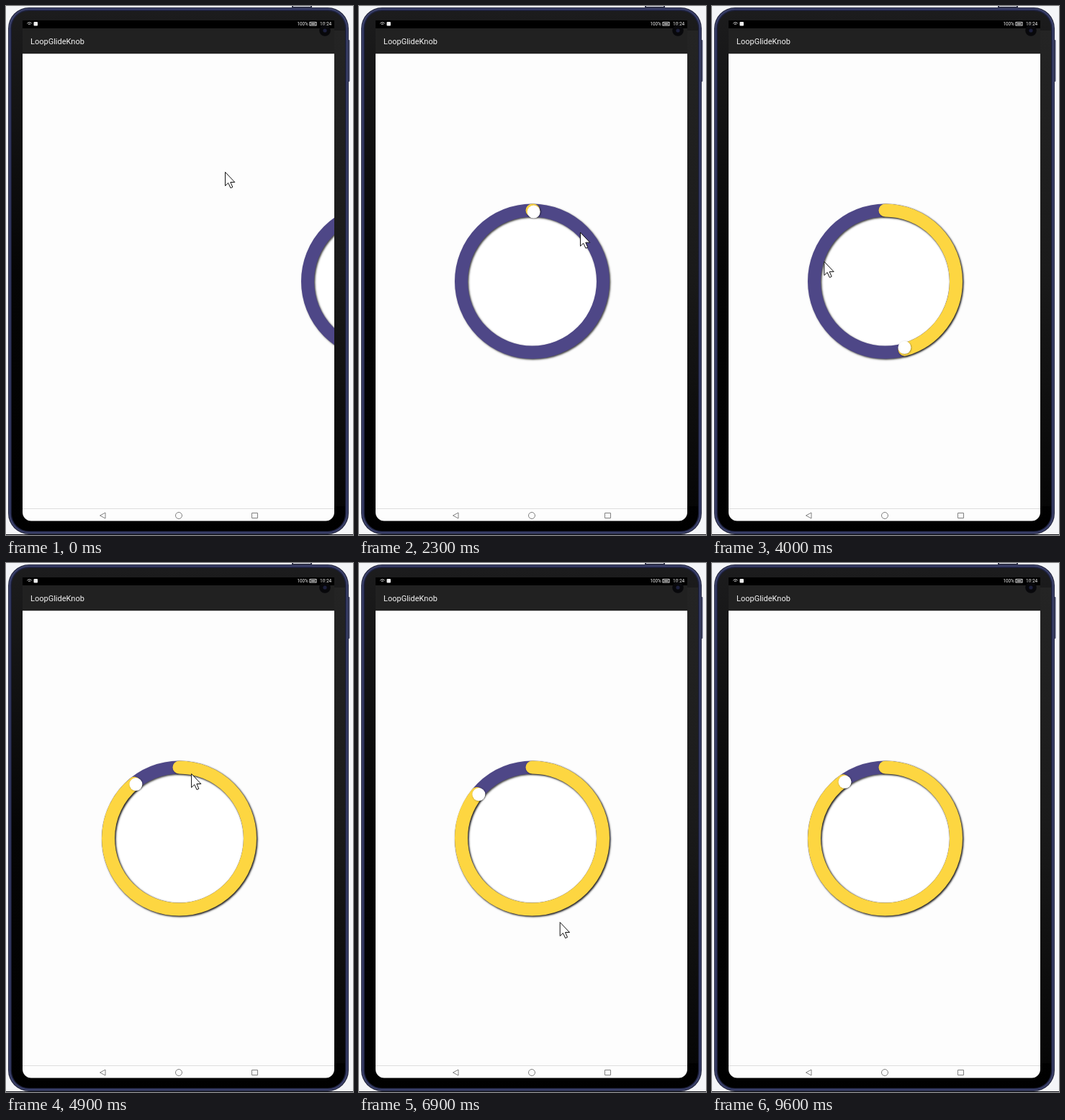
These frames come from a looping animation (482x734 px, 9.7 s). An HTML page with a canvas:

```html
<!DOCTYPE html>
<html lang="en">
<head>
<meta charset="utf-8">
<title>Ring slider</title>
<style>
  html, body { margin: 0; width: 100%; height: 100%; overflow: hidden; background: #f4f5f8; }
  canvas { display: block; }
</style>
</head>
<body>
<canvas id="stage" width="482" height="734"></canvas>
<script>
const c = document.getElementById('stage').getContext('2d');
const LOOP = 9700, STEP = 100, TAU = Math.PI * 2;
const CX = 240.5, CY = 382, R = 98.5;
const GRAB = 1500, LEAVE = 7800, GONE = 9000, LAG = 540;

// Turning points of the drag: time, clockwise degrees from the top, distance from the centre
const DRAG = [
  [1900, 1, 105], [2300, 44, 95], [3460, 524, 88], [4000, 648, 90], [5260, 763, 92],
  [5800, 745, 91], [6360, 669, 108], [6900, 522, 122], [7800, 343, 117], [8500, 324, 117]
];

const mix = (a, b, p) => a + (b - a) * p;
const clamp = p => Math.min(Math.max(p, 0), 1);
const rad = deg => (deg - 90) * Math.PI / 180;
const polar = (x, y, deg, r) => [x + r * Math.cos(rad(deg)), y + r * Math.sin(rad(deg))];

function drag(t) {
  const i = DRAG.findIndex(k => k[0] > t);
  const b = DRAG.at(i), a = DRAG[Math.max(i < 0 ? DRAG.length - 1 : i - 1, 0)];
  const p = b === a ? 0 : clamp((t - a[0]) / (b[0] - a[0]));
  return [mix(a[1], b[1], p), mix(a[2], b[2], p)];
}

function pointerAt(t) {
  if (t < GRAB) return [mix(304, 245, t / GRAB), mix(230, 277, t / GRAB)];
  if (t < LEAVE) return polar(241, 382, ...drag(t));
  const p = (t - LEAVE) / (GONE - LEAVE);
  return [mix(207, 44, 1 - (1 - p) ** 2), mix(270, 740, p)];
}

function rect(x, y, w, h, fill) {
  c.fillStyle = fill;
  c.fillRect(x, y, w, h);
}

function round(x, y, w, h, r, fill) {
  c.beginPath();
  c.roundRect(x, y, w, h, r);
  c.fillStyle = fill;
  c.fill();
}

function disc(x, y, r, fill) {
  c.beginPath();
  c.arc(x, y, r, 0, TAU);
  c.fillStyle = fill;
  c.fill();
}

function label(text, x, y, size) {
  c.font = size + 'px Roboto, sans-serif';
  c.fillStyle = '#f4f4f4';
  c.fillText(text, x, y);
}

function shadow(alpha, blur, offset) {
  c.shadowColor = `rgba(0,0,0,${alpha})`;
  c.shadowBlur = blur;
  c.shadowOffsetX = c.shadowOffsetY = offset;
}

function fade(y0, y1, ...colors) {
  const g = c.createLinearGradient(0, y0, 0, y1);
  colors.forEach((col, i) => g.addColorStop(i / (colors.length - 1), col));
  return g;
}

function tablet() {
  rect(0, 0, 482, 734, '#f4f5f8');
  rect(397, 0, 28, 2, '#33354a');
  rect(399, 0, 24, 1, '#dfe0e6');
  rect(0, 733, 482, 1, '#15161c');
  round(475, 47, 2.5, 58, 1, '#4a4e6c');
  // nested rims, from the outer edge inwards
  ['#23263f', '#454b77', '#2c3156', '#191c33'].forEach((col, i) => {
    const d = i * 1.3;
    round(3 + d, 2 + d, 473 - 2 * d, 731 - 2 * d, 29 - d, col);
  });
  round(8, 7, 463, 721.5, 24, fade(7, 729, '#1c1c1d', '#050505', '#000'));
  rect(456, 34, 15, 660, fade(34, 694, '#242424', '#1a1a1a', '#060606'));
  rect(23, 20, 433, 46, '#000');
}

function screen() {
  rect(23, 31, 433, 35, '#212121');
  round(23, 66, 433, 648.5, [0, 0, 12, 12], '#fdfdfd');
  rect(23, 66, 433, 1, '#d0d0d0');
  label('LoopGlideKnob', 34, 53, 11);

  rect(23, 697, 433, 1, '#dedede');
  c.strokeStyle = '#808080';
  c.lineWidth = 1;
  c.beginPath();
  c.moveTo(138, 703);
  c.lineTo(138, 711);
  c.lineTo(130.5, 707);
  c.closePath();
  c.moveTo(244.5, 707);
  c.arc(240, 707, 4.5, 0, TAU);
  c.rect(341.5, 703.5, 8, 7);
  c.stroke();
}

function statusBar() {
  c.strokeStyle = '#ddd';
  c.lineWidth = 1;
  for (const r of [2, 4.2]) {
    c.beginPath();
    c.arc(32.5, 27, r, Math.PI * 1.23, Math.PI * 1.77);
    c.stroke();
  }
  round(38.5, 22, 5.5, 5.5, 1, '#eee');
  label('100%', 404.5, 27, 6.3);
  c.strokeRect(422, 22.5, 9, 4.5);
  rect(423.5, 24, 6, 1.5, '#ddd');
  label('10:24', 436, 27, 6.5);
  disc(443, 34, 7.8, '#08080b');
  disc(443, 34, 2.6, '#1c1f3c');
}

function arc(to, color) {
  c.beginPath();
  c.arc(CX, CY, R, rad(0), rad(to));
  c.strokeStyle = color;
  c.lineWidth = 18;
  c.stroke();
}

function ring(shift, deg) {
  c.save();
  c.beginPath();
  c.rect(23, 68, 433, 629);
  c.clip();
  c.translate(shift, 0);
  disc(CX, CY, R, '#fff');
  shadow(0.75, 2.5, 1.3);
  arc(360, '#4e4787');
  c.lineCap = 'round';
  shadow(0.5, 2.5, 1.3);
  arc(deg, '#fdd641');
  shadow(0.4, 2, 0.6);
  disc(...polar(241, 381.5, deg, 96), 9, '#fff');
  c.restore();
}

function pointer(x, y) {
  c.save();
  c.translate(x, y);
  c.stroke(c.beginPath());
  c.restore();
}

function arrow(x, y) {
  const path = new Path2D('M.5 .5V19.5L4.7 15.5 8 22.5 10.8 21.2 7.8 14.5H13.8Z');
  c.save();
  c.translate(x, y);
  c.fillStyle = '#fff';
  c.fill(path);
  c.strokeStyle = '#111';
  c.lineWidth = 1;
  c.stroke(path);
  c.restore();
}

function draw(now) {
  const t = Math.floor(now % LOOP / STEP) * STEP;
  tablet();
  screen();
  ring(277 * (1 - clamp(t / 600)) ** 2, drag(t - LAG)[0] % 360);
  statusBar();
  if (t < GONE) arrow(...pointerAt(t));
}

const start = performance.now();
function frame() {
  draw(performance.now() - start);
  requestAnimationFrame(frame);
}
frame();
</script>
</body>
</html>
```
